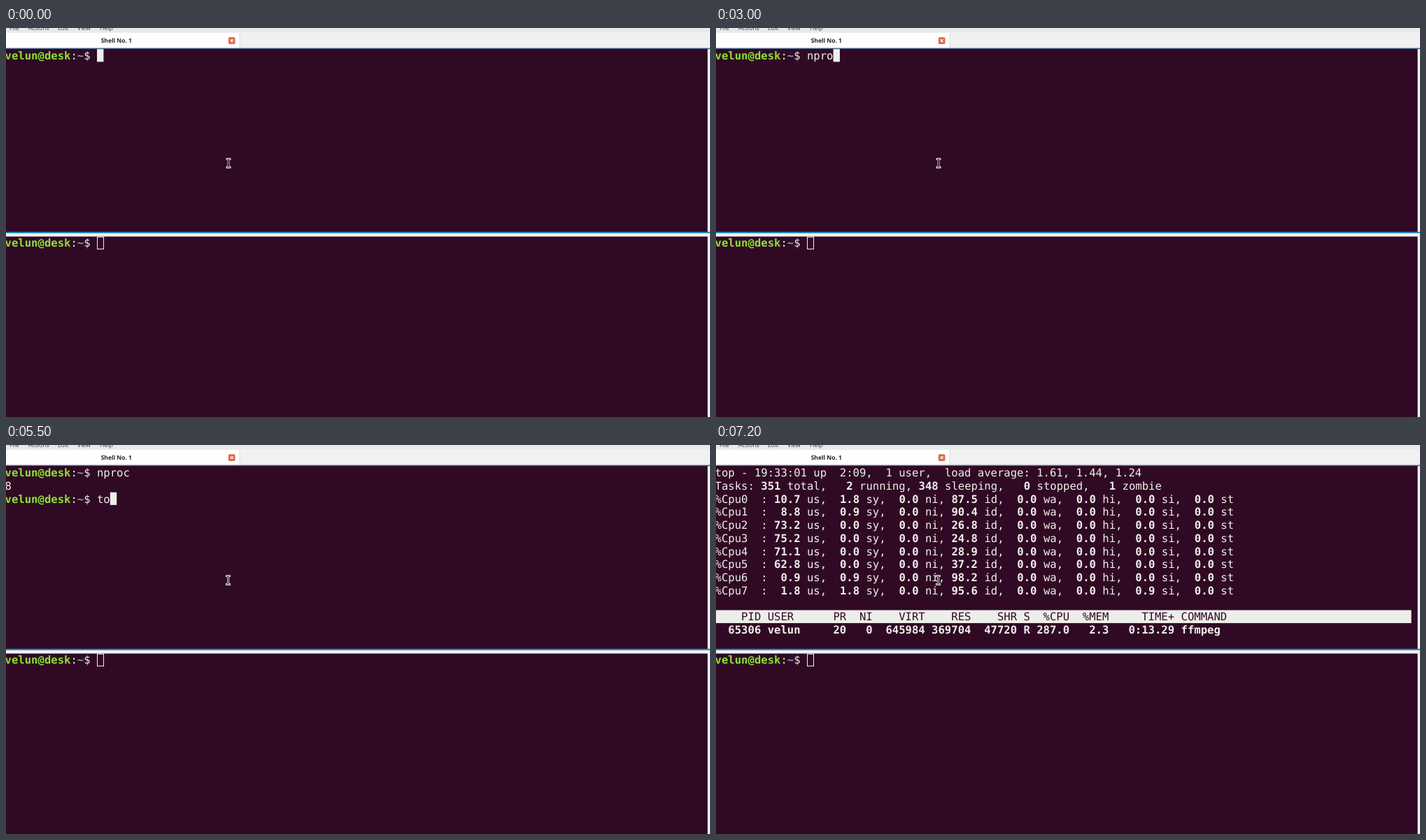
An HTML page for the animation above (8000 ms loop, 1006x557 px).

```html
<!DOCTYPE html>
<html lang="en">
<head>
<meta charset="utf-8">
<title>Terminal</title>
<style>
  html, body { margin: 0; width: 100%; height: 100%; overflow: hidden; background: #300a24; }
  svg { display: block; width: 100%; height: 100%; }
  text { white-space: pre; text-rendering: geometricPrecision; }
  .term { font: 15.59px "DejaVu Sans Mono", monospace; fill: #f0efec; }
  .term .b { font-weight: 700; }
  .ui { font: 8.7px "Open Sans", sans-serif; fill: #3a3a3a; }
  .tab { font: 700 8.5px "Open Sans", sans-serif; fill: #222; }
</style>
</head>
<body>
<svg viewBox="0 0 1006 557">
  <rect width="1006" height="557" fill="#f1f1f1"/>
  <rect width="1006" height="6.5" fill="#e9e9e9"/>
  <g id="menu" class="ui"></g>
  <rect y="7" width="334" height="22" fill="#fff"/>
  <rect x="333.5" y="8" width="1" height="21" fill="#dcdcdc"/>
  <text class="tab" x="157.8" y="21.2" text-anchor="middle">Shell No. 1</text>
  <rect x="317.8" y="13.3" width="9.6" height="9.6" rx="1.6" fill="#df6549"/>
  <path d="M320.6 16.1l4 4m0-4l-4 4" stroke="#fff" stroke-width="1.3"/>
  <rect y="28.6" width="1006" height="1.6" fill="#47698c"/>
  <rect y="30" width="1002.6" height="262" fill="#300a24"/>
  <rect y="291.8" width="1006" height="2" fill="#1689c0"/>
  <rect y="298.6" width="1002.6" height="259" fill="#300a24"/>
  <g id="top" class="term"></g>
  <g id="bottom" class="term"></g>
  <rect x="130.5" y="299.3" width="9" height="17.2" fill="none" stroke="#f0efec"/>
  <g id="mouse" fill="none" stroke-linecap="square">
    <path id="beam" d="M316 187.7h.8q1.2 0 1.2 1.4v9q0 1.4-1.2 1.4h-.8M320 187.7h-.8q-1.2 0-1.2 1.4v9q0 1.4 1.2 1.4h.8" stroke="#fff" stroke-width="2.8"/>
    <use href="#beam" style="stroke:#000"/>
    <path d="M316 187.7h.8q1.2 0 1.2 1.4v9q0 1.4-1.2 1.4h-.8M320 187.7h-.8q-1.2 0-1.2 1.4v9q0 1.4 1.2 1.4h.8" stroke="#1a0713" stroke-width="1"/>
  </g>
</svg>
<script>
const LOOP = 8000, COL = 9.386, ROW = 18.75, LEFT = -1.4, BASE = 45.2;
const USER = "velun", HOST = "desk", ADMIN = "main";
const $ = id => document.getElementById(id);
$("mouse").querySelector("use").remove();

const colX = c => LEFT + c * COL;
const put = (s, col, y, cls = "", fill = "") =>
  `<text x="${colX(col).toFixed(2)}" y="${y}" class="${cls}"${fill && ` fill="${fill}"`}>${s}</text>`;

// Asterisks switch bold on and off.
function line(s, row, fill) {
  let col = 0;
  return s.split("*").map((part, i) => {
    const out = part.trim() ? put(part, col, BASE + row * ROW, i % 2 ? "b" : "", fill) : "";
    col += part.length;
    return out;
  }).join("");
}

function prompt(y, cmd = "") {
  const who = `${USER}@${HOST}`, n = who.length;
  return put(who, 0, y, "b", "#8ae234") + put(":", n, y) +
    put("~", n + 1, y, "b", "#729fcf") + put("$ " + cmd, n + 2, y);
}

const block = (col, row) =>
  `<rect x="${colX(col).toFixed(2)}" y="${30.2 + row * ROW}" width="9.4" height="18.2" fill="#f0efec"/>`;

// Right-aligned columns, except the user and the command.
function record(s) {
  const [pid, user, pr, ni, virt, res, shr, st, cpu, mem, time, cmd] = s.split(" ");
  const row = pid.padStart(7) + " " + user.padEnd(9) + pr.padStart(3) + ni.padStart(4) +
    virt.padStart(8) + res.padStart(7) + shr.padStart(7) + " " + st +
    cpu.padStart(6) + mem.padStart(6) + time.padStart(10) + " " + cmd;
  return st === "R" ? `*${row}*` : row;
}

function cpuLine(label, us, sy, id, si = 0) {
  const values = { us, sy, ni: 0, id, wa: 0, hi: 0, si, st: 0 };
  return label + Object.entries(values)
    .map(([k, v]) => `*${v.toFixed(1).padStart(5)}* ${k}`).join(",");
}

const summary = (clock, load) => [
  `top - ${clock} up  2:09,  1 user,  load average: ${load}`,
  "Tasks: *351* total,   *2* running, *348* sleeping,   *0* stopped,   *1* zombie"
];
const header = record("PID USER PR NI VIRT RES SHR S %CPU %MEM TIME+ COMMAND");

const totals = [
  ...summary("19:33:00", "1.31, 1.38, 1.22"),
  cpuLine("%Cpu(s):", 37.7, 0, 62.3),
  "MiB Mem :  *15867.8* total,   *2969.6* free,   *7010.2* used,   *5888.0* buff/cache",
  "MiB Swap:  *39061.0* total,  *39061.0* free,      *0.0* used.   *7550.0* avail Mem",
  "",
  header,
  ...[
    `65306 ${USER} 20 0 645984 369704 47720 R 313.3 2.3 0:09.99 ffmpeg`,
    `1391 ${ADMIN} 20 0 26.0g 297496 224084 S 6.7 1.8 5:23.04 Xorg`,
    `4196 ${USER} 20 0 1156.1g 332200 159464 S 6.7 2.0 3:19.62 brave`,
    `61821 ${USER} 20 0 1512356 115212 91140 S 6.7 0.7 0:03.08 qterminal`,
    `65399 ${USER} 20 0 13356 4228 3364 R 6.7 0.0 0:00.01 top`,
    `1 ${ADMIN} 20 0 166824 11920 8144 S 0.0 0.1 0:01.37 systemd`
  ].map(record)
];

const perCore = [
  ...summary("19:33:01", "1.61, 1.44, 1.24"),
  ...[
    [10.7, 1.8, 87.5], [8.8, 0.9, 90.4], [73.2, 0, 26.8], [75.2, 0, 24.8],
    [71.1, 0, 28.9], [62.8, 0, 37.2], [0.9, 0.9, 98.2], [1.8, 1.8, 95.6, 0.9]
  ].map((v, i) => cpuLine(`%Cpu${i}  :`, ...v)),
  "",
  header,
  record(`65306 ${USER} 20 0 645984 369704 47720 R 287.0 2.3 0:13.29 ffmpeg`)
];

function screen(lines, band) {
  return lines.map((s, row) => s !== header ? line(s, row) :
    `<rect y="${30.2 + row * ROW}" width="993.6" height="18.6" fill="${band}"/>` +
    line(s, row, "#300a24")).join("");
}

const typed = (word, times, t) => word.slice(0, times.filter(k => t >= k).length);

function shell(t) {
  const first = typed("nproc", [1500, 2600, 2800, 3000, 3500], t);
  if (t < 3700) return prompt(BASE, first) + block(14 + first.length, 0);
  const second = typed("top", [5400, 5500, 5600], t);
  return prompt(BASE, first) + line("8", 1) + prompt(BASE + 2 * ROW, second) +
    (t < 6000 ? block(14 + second.length, 2) : "");
}

let shown = "";
function draw(t) {
  const view = t < 6100 ? shell(t) :
    t < 7200 ? screen(totals, "#f1eaf0") : screen(perCore, "#edede9");
  if (view !== shown) $("top").innerHTML = shown = view;
  $("mouse").setAttribute("transform", `translate(${t < 4800 ? 0 : -0.6} 0)`);
}

$("menu").innerHTML = [["File", 5], ["Actions", 32], ["Edit", 74], ["View", 102], ["Help", 134]]
  .map(([s, x]) => `<text x="${x}" y="3.2">${s}</text>`).join("");
$("bottom").innerHTML = prompt(313.4);

const start = performance.now();
function tick() {
  draw((performance.now() - start) % LOOP);
  requestAnimationFrame(tick);
}
draw(0);
requestAnimationFrame(tick);
</script>
</body>
</html>
```
